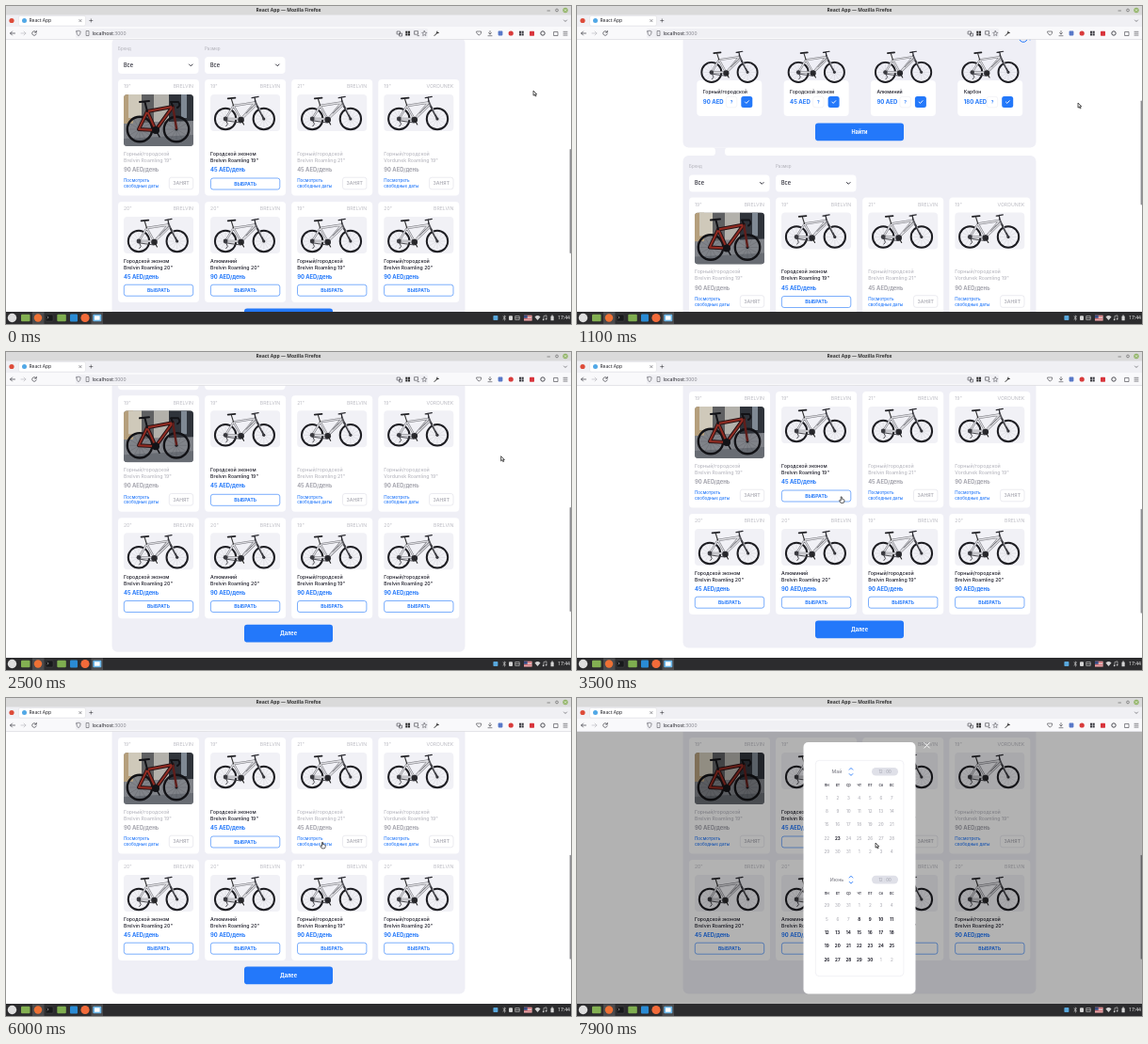
These frames come from a looping animation (600 by 338 pixels, 8000 ms). An HTML page:

```html
<!DOCTYPE html>
<html lang="ru">
<head>
<meta charset="utf-8">
<title>React App</title>
<style>
html, body { margin: 0; width: 100%; height: 100%; overflow: hidden; background: #fff; }
svg { display: block; width: 100vw; height: 100vh; }
text { font-family: Inter, "Noto Sans", sans-serif; white-space: pre; }
.ui text { font-family: "Noto Sans", "Open Sans", sans-serif; }
</style>
</head>
<body>
<svg id="stage" viewBox="0 0 600 338" xmlns="http://www.w3.org/2000/svg"></svg>
<script>
const BLUE = '#2378fa', PANEL = '#efeff6', INK = '#1b1b27', PALE = '#b9b9c1';
const BRAND = 'BRELVIN', BRAND2 = 'VORDUNEK', MODEL = 'Roamling';

const rect = (x, y, w, h, fill, r = 0, extra = '') =>
  `<rect x="${x}" y="${y}" width="${w}" height="${h}" rx="${r}" fill="${fill}" ${extra}/>`;
const circle = (x, y, r, fill, extra = '') =>
  `<circle cx="${x}" cy="${y}" r="${r}" fill="${fill}" ${extra}/>`;
const line = (d, color, width = 0.8, extra = '') =>
  `<path d="${d}" fill="none" stroke="${color}" stroke-width="${width}" stroke-linecap="round" stroke-linejoin="round" ${extra}/>`;
// y is the middle of the capitals
const text = (x, y, s, size, color = INK, weight = 500, anchor = 'start') =>
  `<text x="${x}" y="${y + size * 0.36}" font-size="${size}" fill="${color}" font-weight="${weight}" text-anchor="${anchor}">${s}</text>`;
const group = (inner, attrs = '') => `<g ${attrs}>${inner}</g>`;
const at = (x, y, inner) => group(inner, `transform="translate(${x} ${y})"`);
const outlined = (x, y, w, h, color, r, width = 0.6) =>
  rect(x, y, w, h, '#fff', r, `stroke="${color}" stroke-width="${width}"`);
const fourSquares = (x, y, size, color) =>
  [0, 1, 2, 3].map(i => rect(x + (i % 2) * size * 1.25, y + (i >> 1) * size * 1.25, size, size, color)).join('');

function wheel(x, y, r, tyre, rim, width) {
  let spokes = '';
  for (let i = 0; i < 12; i++) {
    const a = i * Math.PI / 6;
    spokes += `M${x} ${y}l${(r * Math.cos(a)).toFixed(2)} ${(r * Math.sin(a)).toFixed(2)}`;
  }
  return line(spokes, rim, 0.2) +
    circle(x, y, r, 'none', `stroke="${tyre}" stroke-width="${width}"`) +
    circle(x, y, 1.5, tyre);
}

function whiteBike() {
  const frame = 'M24.5 12L47.5 8.5L32.5 26.5L24.5 12L16 26H32M48.5 11L32.5 26.5';
  return wheel(16, 26, 11.2, '#1d1d22', '#a2a2a8', 2) + wheel(56.7, 26, 11.2, '#1d1d22', '#a2a2a8', 2) +
    line(frame, '#77777e', 2.3) + line(frame, '#dcdce0', 1.3) +
    line('M47.5 7L50.5 14', '#55555b', 1.8) + line('M50 13L56.7 26', '#3a3a40', 1.9) +
    line('M52 15L55 21', '#c9c9ce', 0.8) + line('M44 13.5L38 20', '#55555c', 0.8) +
    line('M24.5 12L22.3 5', '#333', 1.1) +
    line('M18.6 4.4L26.3 3.6', '#202024', 1.8) + line('M44 3.6L51 2.4M47.6 7L47 3', '#2b2b31', 1.3) +
    circle(32.5, 27, 3.3, '#29292e') + line('M32.5 27L35.5 32', '#222', 1.1) +
    line('M16 27.8L32 30M16 26l2.2 5.6l-1.5 2', '#3a3a40', 0.9) + circle(16, 26, 2.4, '#3a3a40');
}

function redPhoto() {
  const frame = 'M25 18L52 13L34 38L25 18L16 37L34 38';
  return group(
    rect(0, 0, 74, 55, '#828487') + rect(0, 0, 10, 31, '#b59f7c') + rect(5, 0, 14, 25, '#cfc9ba') +
    rect(19, 0, 13, 32, '#5f6062') + rect(32, 0, 18, 29, '#b3b1ab') + rect(48, 0, 26, 33, '#2f333a') +
    rect(61, 0, 6, 25, '#7f8994') + '<path d="M0 31L74 28V55H0Z" fill="#808389"/>' +
    '<path d="M0 47L74 43V55H0Z" fill="#686c73"/>' +
    wheel(17, 37, 13.2, '#121216', '#45464b', 2.4) + wheel(56, 37, 13.2, '#121216', '#45464b', 2.4) +
    line(frame, '#2a1315', 4) + line(frame, '#932c22', 1.9) + line('M52 12L56 36', '#5f1e1b', 2.5) +
    line('M25 18L22.5 8M17 8L27 7M52 12L50 8L58 8Q61 12 57 14', '#121216', 2) +
    circle(34, 38, 4, '#121216') + line('M34 38L38 45', '#121216', 1.5),
    'clip-path="url(#photo)"');
}

const kinds = ['Горный/городской', 'Городской эконом', 'Алюминий', 'Карбон'];
const cards = [
  // kind, inches, price, taken
  [0, 19, 90, true], [1, 19, 45, false], [0, 21, 45, true], [0, 19, 90, true],
  [1, 20, 45, false], [2, 20, 90, false], [0, 19, 90, false], [0, 20, 90, false]
];

function card([kind, inches, price, taken], i) {
  const low = i > 3, other = i === 3;
  const mid = low ? 63 : 79;
  const brand = other ? BRAND2 : BRAND;
  const name = brand[0] + brand.slice(1).toLowerCase();
  const ink = taken ? PALE : INK;
  let s = rect(0, 0, 86, low ? 107 : 123.5, '#fff', 4) +
    text(6, 7.6, inches + '"', 5.1, '#bcbcc4', 400) +
    text(80, 7.6, brand, 5.2, '#bcbcc4', 400, 'end') +
    (i ? rect(6, 16, 74, 39, '#f1f1f6', 4) + at(6, 16, '<use href="#bike"/>') : at(6, 16, redPhoto())) +
    text(6, mid, kinds[kind], 5.25, ink) +
    text(6, mid + 7, `${name} ${MODEL} ${inches}"`, 5.2, ink) +
    text(6, mid + 17, price + ' AED/день', 5.8, taken ? '#a4a4ad' : BLUE, 700);
  if (taken) {
    s += text(6, 107.8, 'Посмотреть', 4.5, BLUE) + text(6, 113.4, 'свободные даты', 4.5, BLUE) +
      outlined(54.3, 104.2, 25.4, 12.6, '#dedee6', 2.5) + text(67, 110.5, 'ЗАНЯТ', 5.1, '#b0b0b8', 600, 'middle');
  } else {
    const y = low ? 88.2 : 105;
    s += outlined(6.3, y, 73.4, 12, BLUE, 2.5) + text(43, y + 6, 'ВЫБРАТЬ', 5, BLUE, 700, 'middle');
  }
  return at(119 + (i % 4) * 92.1, low ? 208 : 78, s);
}

const button = (y, label) =>
  rect(253, y, 94, 18.7, BLUE, 3) + text(300, y + 9.3, label, 5.5, '#fff', 700, 'middle');

const select = (x, label) =>
  text(x, 45, label, 4.5, PALE) + rect(x, 54, 85.5, 18, '#fff', 4) +
  text(x + 6, 63, 'Все', 5.5) + line(`M${x + 75.5} 62l1.8 1.8l1.8-1.8`, INK, 0.9);

function option(kind, i) {
  const price = [90, 45, 90, 180][i];
  return at(127.3 + i * 92.3, -125.5, rect(0, 79, 69, 38, '#fff', 4) +
    group('<use href="#bike"/>', 'transform="translate(.5 46) scale(.94)"') +
    text(6.5, 91, kind, 5.1) + text(6.5, 102, price + ' AED', 6, BLUE, 700) +
    outlined(31, 96.3, 11.5, 11.5, '#ececf2', 2.5) + text(36.8, 102, '?', 5, BLUE, 600, 'middle') +
    rect(47, 96, 12, 12, BLUE, 2.5) + line('M51.2 102l1.4 1.4l2.5-2.7', '#fff', 0.9));
}

function page() {
  return rect(112.5, -300, 375, 325, PANEL, 6) + rect(112.5, 33.5, 375, 317, PANEL, 6) +
    '<path d="M144 25Q147 25 147 29.2Q147 33.5 144 33.5H160Q157 33.5 157 29.2Q157 25 160 25Z" fill="' + PANEL + '"/>' +
    circle(474, -91.5, 4.3, 'none', `stroke="${BLUE}" stroke-width="1"`) + line('M481 -91.5v2', BLUE, 1) +
    kinds.map(option).join('') + button(-1, 'Найти') +
    select(119, 'Бренд') + select(211, 'Размер') +
    cards.map(card).join('') + button(321.5, 'Далее');
}

function month(y, name, first, lastOfPrev, length, isOpen) {
  let s = text(276, y, name, 5.2, '#85858e', 500, 'middle') +
    line(`M289.2 ${y - 2}l1.8-1.8l1.8 1.8M289.2 ${y + 2.4}l1.8 1.8l1.8-1.8`, BLUE, 0.9) +
    rect(313, y - 4.2, 28, 8.6, '#dfe0e8', 4.3) + text(327, y, '12 : 00', 4.2, '#a9aab5', 500, 'middle');
  'пн вт ср чт пт сб вс'.split(' ').forEach((d, i) =>
    s += text(265.3 + i * 11.5, y + 14.3, d, 4, '#3c3c48', 600, 'middle'));
  for (let i = 0; i < 35; i++) {
    const n = i + first;
    const inside = n > 0 && n <= length, open = inside && isOpen(n);
    const day = n < 1 ? lastOfPrev + n : inside ? n : n - length;
    s += text(265.3 + (i % 7) * 11.5, y + 27.8 + Math.floor(i / 7) * 14.35, day, 4.5,
      open ? INK : '#b0b0b8', open ? 700 : 500, 'middle');
  }
  return s;
}

function modal() {
  return rect(0, 35.5, 600, 289.5, '#000', 0, 'opacity=".3"') +
    rect(240.5, 47, 119, 267.5, '#fff', 5) +
    line('M368.8 47.5l5.6 5.6M374.4 47.5l-5.6 5.6', '#fff', 0.9) +
    outlined(253.3, 66.3, 93.6, 229.4, '#e8e8ee', 4, 0.6) +
    month(78.2, 'Май', 1, 30, 31, n => n === 23) +
    month(193, 'Июнь', -2, 31, 30, n => n > 7);
}

function browser() {
  const dark = '#3b3b42';
  return rect(0, 0, 600, 35.5, '#f0f0f4') + rect(0, 0, 600, 9.5, '#dadada') +
    text(300, 4.2, 'React App — Mozilla Firefox', 5, '#303030', 600, 'middle') +
    line('M575 5h2.5', '#666', 0.7) + circle(585, 4.5, 1.4, 'none', 'stroke="#666" stroke-width=".7"') +
    circle(594, 4.5, 2.7, '#8fb264') + line('M593 3.5l2 2m0-2l-2 2', '#fff', 0.6) +
    circle(6, 15.5, 2.6, '#dd4b39') +
    rect(13.5, 10.5, 71, 10.5, '#fff', 1.5, 'stroke="#d5d5da" stroke-width=".4"') +
    circle(19.5, 15.5, 2.5, '#52a8e6') + text(24.5, 15.5, 'React App', 5, '#25252b', 400) +
    line('M77.7 14.4l2.4 2.4m0-2.4l-2.4 2.4', dark, 0.5) + line('M88.7 15.5h3.2m-1.6-1.6v3.2', dark, 0.6) +
    line('M592.5 15l1.5 1.5l1.5-1.5', dark, 0.6) +
    rect(0, 22, 600, 13.5, '#f9f9fb') +
    line('M9.5 29h-5m2-2l-2 2l2 2', dark, 0.7) + line('M16 29h5m-2-2l2 2l-2 2', '#bcbcc2', 0.7) +
    line('M32 27.8a2.3 2.3 0 1 0 .2 2M32.3 26.3v1.8h-1.8', dark, 0.7) +
    rect(74, 24, 374, 10, '#f0f0f4', 1.5) +
    line('M74.8 27l2.2-.8l2.2.8q0 3.5-2.2 4.8q-2.2-1.3-2.2-4.8Z', dark, 0.5) +
    line('M85.5 26.5h2.5v5h-2.5Z', dark, 0.5) +
    text(91.5, 28.8, 'localhost<tspan fill="#85858d">:3000</tspan>', 5.3, '#222228', 400) +
    line('M415.5 27h3v3h-3ZM418 29h2.5v3h-2.5Z', dark, 0.6) + fourSquares(424.3, 26.7, 2.1, '#222') +
    line('M434 26.7h3.5v3.5h-3.5ZM437 31.6h1.5', dark, 0.6) +
    line('M444.3 26.5l.8 1.7l1.8.2l-1.3 1.3l.3 1.8l-1.6-.9l-1.6.9l.3-1.8l-1.3-1.3l1.8-.2Z', dark, 0.5) +
    line('M455 31.5l2.8-2.8m0 0l1.5-.2m-1.5.2l.1-1.6', '#222', 1) +
    line('M500 27h4.5v2q-2.2 4-4.5 0Z', dark, 0.6) + line('M514 26.5v3.5m-1.5-1.5l1.5 1.5l1.5-1.5M512 31.7h4', dark, 0.6) +
    rect(522.6, 26.6, 4.8, 4.8, '#5878c8', 0.8) + circle(536.2, 29, 2.6, '#d83b3b') +
    fourSquares(545, 26.7, 2.1, '#33333a') + rect(556, 26.7, 5, 5, '#d8343c', 0.6) +
    circle(570, 29, 2.2, 'none', `stroke="${dark}" stroke-width=".9"`) +
    line('M582 27.5h4v4h-4ZM592 27.3h4M592 29.2h4M592 31.1h4', dark, 0.6) +
    rect(0, 35.1, 600, 0.5, '#cfcfd4');
}

function taskbar() {
  const pale = '#d4d4d4';
  let flag = rect(550, 328.8, 8.5, 5.6, '#f3f3f3');
  for (let i = 0; i < 4; i++) flag += rect(550, 328.8 + i * 1.6, 8.5, 0.8, '#c9454b');
  return rect(0, 325, 600, 13, '#2c2c2e') +
    rect(28, 325.3, 12.5, 12.7, '#4b4b4d') + rect(90.5, 325.3, 12.5, 12.7, '#4b4b4d') +
    circle(6.5, 331.5, 4.7, '#dedede') +
    rect(16, 327.7, 9.5, 7.6, '#83b052', 1) + circle(34, 331.5, 4.2, '#ed7135') +
    rect(42, 328, 8, 7, '#18191b', 1, 'stroke="#555" stroke-width=".4"') + line('M44 330l1.2 1l-1.2 1', '#ddd', 0.5) +
    rect(54.3, 327.7, 9.5, 7.6, '#7fae50', 1) + rect(68, 327.5, 8, 8, '#2a8bd4', 1) +
    circle(84, 331.5, 4.6, '#f26b3a') + rect(92.3, 327.7, 9, 7.6, '#69b5e8', 1) + rect(94, 329.3, 5.6, 4.4, '#fff') +
    rect(517.4, 329, 5, 5, '#59a8dd', 0.8) + line('M528 330l2.5 3l-1.2 1.2v-5.4l1.2 1.2l-2.5 3', pale, 0.6) +
    rect(534, 329.3, 4, 4.6, pale, 1) + line('M541.2 329.5h4v4h-4Zm0 2h4', pale, 0.6) +
    flag + rect(550, 328.8, 3.7, 3, '#394b82') +
    '<path d="M561.5 330.4Q564.5 327.8 567.5 330.4L564.5 334Z" fill="' + pale + '"/>' +
    line('M571 333.5v-4l3-.7v4', pale, 0.6) + circle(570.6, 333.4, 0.8, pale) + circle(573.6, 332.8, 0.8, pale) +
    rect(578.5, 329.5, 3.2, 4.8, pale, 0.5) + rect(579.3, 328.6, 1.6, 1, pale) +
    text(599, 331.3, '17:44', 5.1, '#f2f2f2', 500, 'end');
}

const arrow = '<path d="M0 0V5.2L1.3 4.1L2.2 6L3.1 5.6L2.2 3.8H3.8Z" fill="#e8e8e8" stroke="#1c1c1c" stroke-width=".7"/>';
const hand = '<path d="M-.5 0Q.1-.6.6 0V2.2Q2.8 2 3.2 3.2V5L2.4 6.4H-.6L-2.2 3.8Q-1.6 3-.5 4Z" fill="#fff" stroke="#1c1c1c" stroke-width=".7"/>';

const stage = document.getElementById('stage');
stage.innerHTML =
  `<defs><g id="bike">${whiteBike()}</g><clipPath id="photo">${rect(0, 0, 74, 55, '#000', 4)}</clipPath></defs>` +
  rect(0, 0, 600, 338, '#fff') + group(page(), 'id="page"') +
  rect(598.6, 152, 1.4, 111, '#8d8d92', 0.7, 'id="thumb"') +
  group(modal(), 'id="modal"') +
  group(browser() + taskbar(), 'class="ui"') +
  group(group(arrow, 'id="arrow"') + group(hand, 'id="hand"'), 'id="cursor"');

const LOOP = 8000, OPEN = 7200;
const scrollSteps = [[0, 0], [100, 0], [950, 125.5], [1200, 125.5], [1900, 43.2], [2600, -36], [LOOP, -36]];
const cursorSteps = [
  [0, 560, 90], [300, 558, 91], [1100, 532, 103], [1900, 529, 109], [2700, 525, 111],
  [3350, 281, 154], [3750, 280, 154], [4500, 330, 154], [5000, 330, 154], [5700, 343, 155],
  [6300, 329, 152], [7250, 329, 152], [7700, 317, 154], [LOOP, 317, 154]
];
const links = [[217, 147, 291, 160], [309, 148, 349, 159]];

function sample(steps, t) {
  let i = 1;
  while (i < steps.length - 1 && steps[i][0] < t) i++;
  const a = steps[i - 1], b = steps[i];
  const p = Math.min(1, Math.max(0, (t - a[0]) / (b[0] - a[0])));
  const e = p * p * (3 - 2 * p);
  return a.slice(1).map((v, k) => v + (b[k + 1] - v) * e);
}

const el = id => document.getElementById(id);
const parts = Object.fromEntries(['page', 'thumb', 'modal', 'cursor', 'arrow', 'hand'].map(id => [id, el(id)]));

function draw(t) {
  const [scroll] = sample(scrollSteps, t);
  const [x, y] = sample(cursorSteps, t);
  const over = scroll < -35 && t < OPEN &&
    links.some(([l, top, r, b]) => x > l && x < r && y > top && y < b);
  parts.page.setAttribute('transform', `translate(0 ${scroll.toFixed(2)})`);
  parts.thumb.setAttribute('y', (152 - scroll * 0.41).toFixed(2));
  parts.modal.setAttribute('opacity', Math.min(1, Math.max(0, (t - OPEN + 50) / 200)));
  parts.cursor.setAttribute('transform', `translate(${x.toFixed(2)} ${y.toFixed(2)})`);
  parts.arrow.setAttribute('visibility', over ? 'hidden' : 'visible');
  parts.hand.setAttribute('visibility', over ? 'visible' : 'hidden');
}

const start = performance.now();
function tick() {
  draw((performance.now() - start) % LOOP);
  requestAnimationFrame(tick);
}
tick();
</script>
</body>
</html>
```
